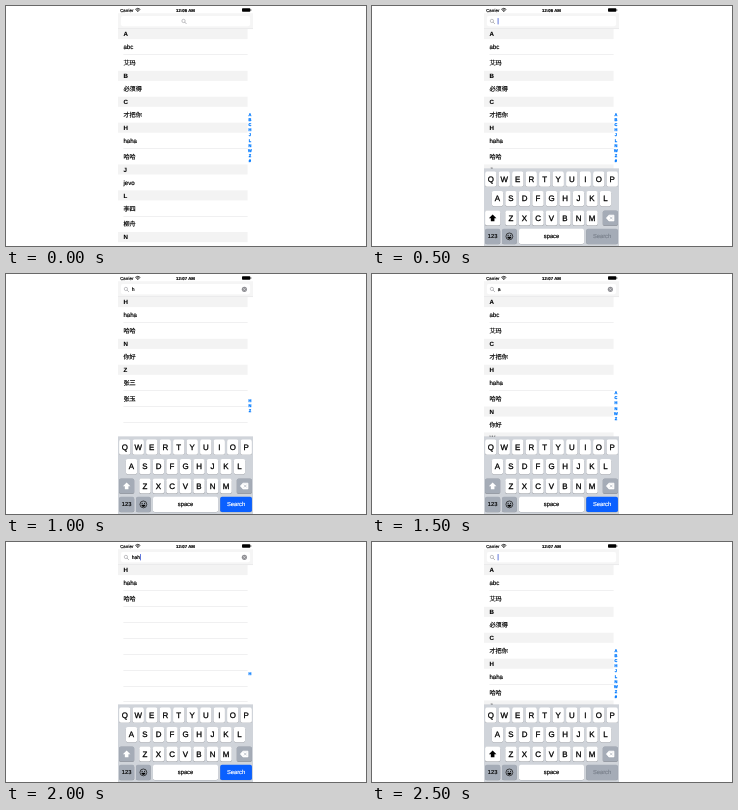
Recreate the animation shown at these times as an HTML page. Size 360x240 px, loop 3 s.

```html
<!DOCTYPE html>
<html lang="zh">
<head>
<meta charset="utf-8">
<title>Contact search</title>
<style>
html, body { margin: 0; width: 100%; height: 100%; overflow: hidden; background: #fff; }
svg { display: block; width: 360px; height: 240px; }
text { font-family: "Liberation Sans", "Noto Sans CJK SC", "Noto Sans CJK", sans-serif; text-rendering: geometricPrecision; }
</style>
</head>
<body>
<svg viewBox="0 0 360 240">
  <clipPath id="phone"><rect width="375" height="667"/></clipPath>
  <g transform="translate(112 0) scale(.36)" clip-path="url(#phone)">
    <g id="list"></g>
    <g id="bar"></g>
    <g id="keys"></g>
  </g>
</svg>
<script>
const STEP = 500, PX = 1 / 0.36;
const BLUE = '#007aff', SEARCH = '#0a60ff', DARK = '#a5acb7';

const people = {
  A: ['abc', '艾玛'], B: ['必须得'], C: ['才把你'], H: ['haha', '哈哈'],
  J: ['jevo'], L: ['李四', '柳舟'], N: ['你好'], W: ['王五'],
  Z: ['张三', '张玉'], '#': ['123']
};
const all = 'ABCHJLNWZ#';

const steps = [
  { time: '12:06', sections: all, idle: true },
  { time: '12:06', sections: all, query: '', caret: true },
  { time: '12:07', sections: 'HNZ', query: 'h' },
  { time: '12:07', sections: 'ACHNWZ', query: 'a' },
  { time: '12:07', sections: 'H', query: 'hah', caret: true },
  { time: '12:07', sections: all, query: '', caret: true }
];

const rect = (x, y, w, h, fill, r = 0, extra = '') =>
  `<rect x="${x}" y="${y}" width="${w}" height="${h}" rx="${r}" fill="${fill}" ${extra}/>`;
// A thin stroke keeps the small glyphs dark.
const text = (x, y, size, str, { fill = '#000', bold, anchor = 'start', weight = .5 } = {}) =>
  `<text x="${x}" y="${y + size * .36}" font-size="${size}" fill="${fill}" text-anchor="${anchor}"` +
  ` stroke="${fill}" stroke-width="${weight}"${bold ? ' font-weight="700"' : ''}>${str}</text>`;
const line = (d, stroke, width) =>
  `<path d="${d}" fill="none" stroke="${stroke}" stroke-width="${width}" stroke-linecap="round"/>`;

function drawList({ sections }) {
  let out = rect(0, 0, 375, 667, '#fff'), y = 64;
  // Hairlines sit on whole screen pixels.
  const rule = () => rect(15, Math.floor(y * .36) * PX, 345, PX, '#f0f0f1');
  for (const key of sections) {
    out += rect(0, y, 360, 28, '#f3f3f3') + text(15, y + 14, 17, key, { bold: true, weight: .3 });
    y += 28;
    people[key].forEach((name, i, rows) => {
      out += text(15, y + 22, 17, name);
      y += 44;
      if (i < rows.length - 1) out += rule();
    });
  }
  for (; y < 667; y += 44) out += rule();
  [...sections].forEach((key, i) => {
    const cy = 365.5 + (i - (sections.length - 1) / 2) * 14;
    out += text(366.5, cy, 11, key, { fill: BLUE, bold: true, anchor: 'middle', weight: .8 });
  });
  return out;
}

function drawStatus(time) {
  return rect(0, 0, 375, 20, '#fff') +
    text(6, 11, 12, 'Carrier') +
    line('M48.8 8.8Q55 3.2 61.2 8.8M51.4 11.6Q55 8.6 58.6 11.6', '#000', 2.2) +
    '<circle cx="55" cy="14.3" r="1.8"/>' +
    text(187.5, 11, 12, time + ' AM', { bold: true, anchor: 'middle' }) +
    rect(344.5, 6, 23, 10, '#000', 2) + rect(368.3, 9, 1.8, 4, '#000', .8);
}

function drawBar({ time, idle, query = '', caret }) {
  const x = idle ? 182 : 22, end = 38 + query.length * 7.8;
  let out = drawStatus(time) + rect(0, 20, 375, 44, '#f5f5f5') +
    rect(0, 63, 375, 1, '#d4d4d5') + rect(8, 28, 359, 28, '#fff', 5) +
    `<circle cx="${x}" cy="41.5" r="4.6" fill="none" stroke="#8e8e93" stroke-width="1.5"/>` +
    line(`M${x + 3.5} 45l4.2 4.2`, '#8e8e93', 1.7) + text(38, 42.5, 14, query);
  if (caret) out += rect(end, 33.5, 2.2, 17.5, '#3a55d0');
  if (query) {
    out += '<circle cx="351" cy="42.5" r="7.2" fill="#8e8e93"/>' +
      line('M348.4 39.9l5.2 5.2m0-5.2l-5.2 5.2', '#fff', 1.3);
  }
  return out;
}

const cap = (x, y, w, fill = '#fff') =>
  rect(x, y + 1, w, 42, '#8b8e94', 5) + rect(x, y, w, 42, fill, 5);

function drawKeys({ idle, query }) {
  if (idle) return '';
  const top = 460, row = 54, mid = { anchor: 'middle' };
  const third = top + 2 * row, last = top + 3 * row - 3;
  let out = rect(0, 451, 375, 216, '#d0d4da');
  ['QWERTYUIOP', 'ASDFGHJKL', 'ZXCVBNM'].forEach((letters, r) => {
    [...letters].forEach((ch, i) => {
      const cx = [18.75, 37.5, 75][r] + i * 37.5, y = top + r * row;
      out += cap(cx - 15.75, y, 31.5) + text(cx, y + 21, 22, ch, { anchor: 'middle', weight: .8 });
    });
  });
  const upper = !query;
  out += cap(3, third, 42, upper ? '#fff' : DARK) +
    `<path d="M24 ${third + 11}l10.5 10.5h-5.5v8.5h-10v-8.5h-5.5z" fill="${upper ? '#000' : '#fff'}"/>` +
    cap(330, third, 42, DARK) +
    `<path d="M340 ${third + 21}l7-8h14v16h-14z" fill="#fff" stroke="#fff" stroke-width="2" stroke-linejoin="round"/>` +
    line(`M350.5 ${third + 18}l6 6m0-6l-6 6`, DARK, 1.8);

  const cy = last + 21;
  out += cap(3, last, 42, DARK) + text(24, cy, 16, '123', mid) +
    cap(50, last, 41, DARK) +
    `<circle cx="70.5" cy="${cy}" r="9.5" fill="none" stroke="#111" stroke-width="2"/>` +
    `<circle cx="67" cy="${cy - 3}" r="1.6"/><circle cx="74" cy="${cy - 3}" r="1.6"/>` +
    `<path d="M64.5 ${cy + 1}h12q-1 6-6 6t-6-6z"/>` +
    cap(97, last, 181) + text(187.5, cy, 16, 'space', mid) +
    cap(284, last, 88, query ? SEARCH : DARK) +
    text(328, cy, 16, 'Search', { fill: query ? '#fff' : '#7b828d', anchor: 'middle' });
  return out;
}

const layers = { list: drawList, bar: drawBar, keys: drawKeys };
let shown = -1;

function show(n) {
  if (n === shown) return;
  shown = n;
  for (const id in layers) document.getElementById(id).innerHTML = layers[id](steps[n]);
}

show(0);
const start = performance.now();
function tick() {
  const t = Math.max(0, performance.now() - start);
  show(Math.floor(t / STEP) % steps.length);
  requestAnimationFrame(tick);
}
requestAnimationFrame(tick);
</script>
</body>
</html>
```
